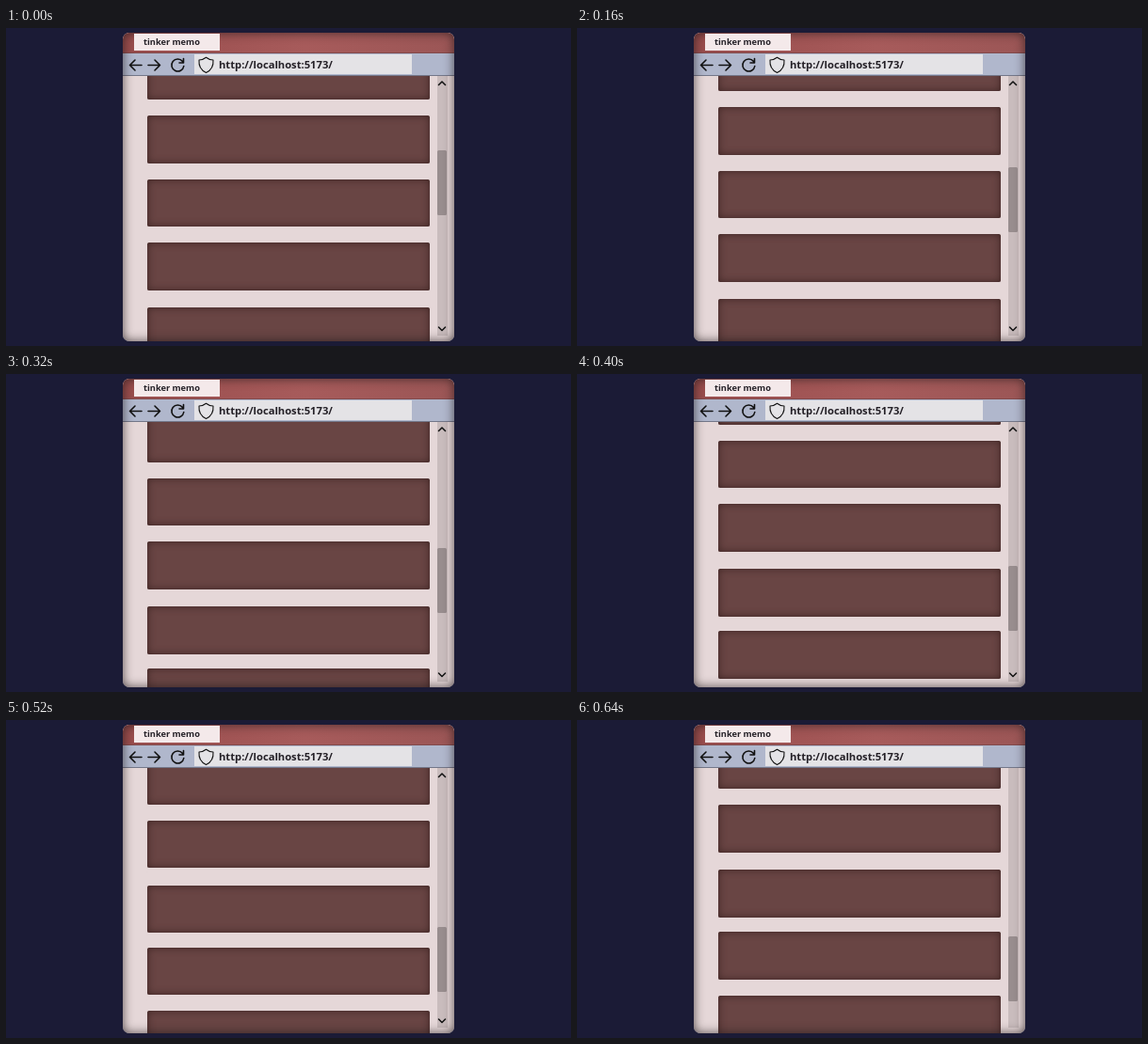
Animation, 600 px wide and 338 px high, one loop 720 ms. Source, as an HTML page:

```html
<!DOCTYPE html>
<html lang="en">
<head>
<meta charset="utf-8">
<title>Scrolling browser</title>
<style>
  html, body { margin: 0; width: 100%; height: 100%; overflow: hidden; background: #1b1b36; }
  div, svg { position: absolute; box-sizing: border-box; }
  #window { left: 124px; top: 5px; width: 352px; height: 328px; border-radius: 7px; overflow: hidden; background: #e5d7d8; }
  #titlebar { width: 352px; height: 22px; background: linear-gradient(90deg, #984c4c, #a75b5b 55%, #9b5656); border-bottom: 1px solid #804a4c; }
  #toolbar { top: 22px; width: 352px; height: 24px; background: #b0b7cc; border-bottom: 1px solid #737789; }
  #page { top: 46px; width: 352px; height: 282px; overflow: hidden; }
  .card { left: 26px; width: 300px; height: 50.5px; border-radius: 2.5px; background: #694544; box-shadow: inset 0 0 9px #3f2524, inset 0 0 1px #3a2221; }
  #track { left: 334px; width: 11px; height: 276px; background: #c9bcbd; }
  #thumb { left: 334px; width: 10px; height: 69px; border-radius: 1.5px; background: #988d8e; }
  #shade { inset: 0; border-radius: 7px; box-shadow: inset 0 0 11px rgba(30, 22, 22, .72); }
  #tab, #address { font-family: "Open Sans", "Noto Sans", sans-serif; font-weight: 700; white-space: pre; color: #242027; }
  #tab { left: 12px; top: 1px; width: 91px; height: 18px; padding-left: 10px; font-size: 9.25px; line-height: 18px; background: #f4e9ea; }
  #address { left: 76px; top: 23px; width: 231px; height: 21px; padding-left: 26px; font-size: 11.2px; line-height: 22px; background: #e4e3e6; }
  svg { left: 0; top: 0; fill: none; stroke: #111; stroke-width: 1.6; stroke-linecap: round; stroke-linejoin: round; }
</style>
</head>
<body>
<div id="window">
  <div id="titlebar"></div>
  <div id="toolbar"></div>
  <div id="page">
    <div id="track"></div>
    <div id="thumb"></div>
  </div>
  <div id="shade"></div>
  <div id="tab">tinker memo</div>
  <div id="address">http://localhost:5173/</div>
</div>
<svg width="600" height="338">
  <path d="M144 39.5H131.5M137 34l-5.5 5.5 5.5 5.5M151 39.5h12.500M158 34l5.500 5.500-5.500 5.500"/>
  <path d="M187.500 35.500a6.500 6.500 0 1 0 1.300 5M188.500 32.500v4.500h-4.500"/>
  <path stroke-width="1.100" d="M212.500 31.200q3.500 2.800 7.500 2.800q.8 9.500-7.500 13.500q-8.300-4-7.500-13.500q4 0 7.500-2.800z"/>
  <path id="chevrons" stroke-width="1.500" d="M459.500 60.500l3.500-3.500 3.500 3.500M459.500 318l3.500 3.500 3.500-3.500"/>
</svg>
<script>
const PAGE_TOP = 51, LOOP = 720, LAST_STEP = 15;
const cardTops = [25.5, 93, 160.5, 228, 297, 363, 430.5];
// [step, pixels scrolled]
const scrollKeys = [[0, 0], [4, 8.7], [6, 23.5], [8, 50], [11, 107.5], [13, 131], [15, 138]];

const page = document.getElementById('page');
const thumb = document.getElementById('thumb');
const chevrons = document.getElementById('chevrons');
const cards = cardTops.map(() => {
  const card = document.createElement('div');
  card.className = 'card';
  return page.appendChild(card);
});

const smooth = p => p * p * (3 - 2 * p);

// Slope at a key, weighted towards its nearer neighbour.
function slopeAt(keys, i) {
  if (i === 0 || i === keys.length - 1) return 0;
  const [[x0, y0], [x1, y1], [x2, y2]] = keys.slice(i - 1, i + 2);
  const before = x1 - x0, after = x2 - x1;
  return ((y1 - y0) / before * after + (y2 - y1) / after * before) / (before + after);
}

function hermite(keys, x) {
  const i = Math.max(0, keys.findIndex(key => key[0] >= x) - 1);
  const [x0, y0] = keys[i], [x1, y1] = keys[i + 1];
  const span = x1 - x0, u = (x - x0) / span, v = 1 - u;
  return y0 + (y1 - y0) * smooth(u)
    + span * u * v * (slopeAt(keys, i) * v - slopeAt(keys, i + 1) * u);
}

// 40 ms steps; the twelfth and the last are held twice as long.
function stepAt(time) {
  const tick = Math.floor(time / 40);
  return Math.min(LAST_STEP, tick > 11 ? tick - 1 : tick);
}

function draw(now) {
  const step = stepAt(now % LOOP);
  const scroll = hermite(scrollKeys, step);
  cards.forEach((card, i) => {
    card.style.top = cardTops[i] - PAGE_TOP - scroll + 'px';
  });
  thumb.style.top = 130 - PAGE_TOP + 100 * smooth(step / LAST_STEP) + 'px';
  chevrons.style.visibility = step === LAST_STEP ? 'hidden' : 'visible';
}

const start = performance.now();
(function tick() {
  draw(performance.now() - start);
  requestAnimationFrame(tick);
})();
</script>
</body>
</html>
```
